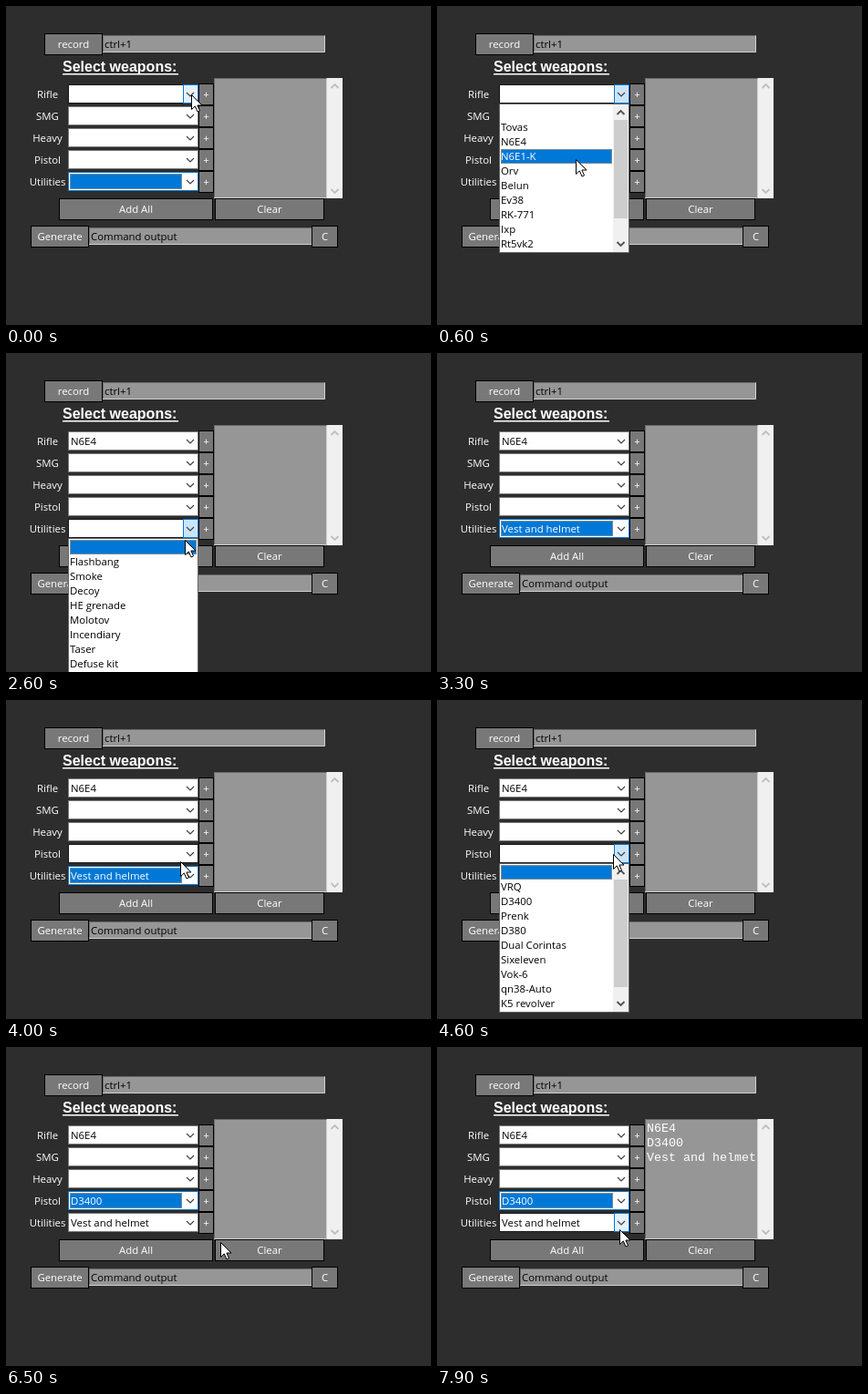
Animation of 466x350 px, one loop 8000 ms. Source, as an HTML page:

```html
<!DOCTYPE html>
<html lang="en">
<head>
<meta charset="utf-8">
<title>Weapon selector</title>
<style>
  html, body { margin: 0; width: 100%; height: 100%; overflow: hidden; background: #2d2d2d; }
  svg { display: block; width: 466px; height: 350px; }
  text { font: 11.4px "Open Sans", sans-serif; white-space: pre; }
  .title { font: bold 16px "Liberation Sans", Arial, sans-serif; }
  .mono { font: 13.33px "Liberation Mono", monospace; }
</style>
</head>
<body>
<svg id="stage" viewBox="0 0 466 350"></svg>
<script>
const LOOP = 8000, TICK = 100;
const BLUE = '#0078d7', GREY = '#969696', FACE = '#787878', DARK = '#696969', LIGHT = '#d0d0d0';
const RIFLE = 0, PISTOL = 3, UTIL = 4;
const ROW = 16, ROWS = 10;
const LABELS = ['Rifle', 'SMG', 'Heavy', 'Pistol', 'Utilities'];

// First ten entries of each list, and how many it holds in all
const LISTS = {
  [RIFLE]: { total: 12, names: ',Tovas,N6E4,N6E1-K,Orv,Belun,Ev38,RK-771,Ixp,Rt5vk2'.split(',') },
  [PISTOL]: { total: 11, names: ',VRQ,D3400,Prenk,D380,Dual Corintas,Sixeleven,Vok-6,qn38-Auto,K5 revolver'.split(',') },
  [UTIL]: { total: 10, names: ',Flashbang,Smoke,Decoy,HE grenade,Molotov,Incendiary,Taser,Defuse kit,Vest and helmet'.split(',') }
};

// Each pick opens a combo box, then stores the chosen row
const PICKS = [
  { combo: RIFLE, open: 200, close: 1300, row: 2 },
  { combo: UTIL, open: 2400, close: 3300, row: 9 },
  { combo: PISTOL, open: 4500, close: 6100, row: 2 }
];
const PRESS = 7400, ADDED = 7500;

const rowTop = i => 86 + 24 * i;
const itemTop = (i, n) => rowTop(i) + 23 + ROW * n;
const arrow = (i, x = 201) => [x, rowTop(i) + 11];
const item = (i, n) => [153, itemTop(i, n) + 11];

// Pointer glides: start, end, destination; it rests in between
const GLIDES = [
  [200, 600, item(RIFLE, 3)],
  [900, 1100, item(RIFLE, 2)],
  [1300, 1800, [177, 154]],
  [1800, 2300, arrow(UTIL)],
  [2500, 3100, item(UTIL, 9)],
  [3300, 4100, arrow(PISTOL, 194)],
  [4700, 5500, item(PISTOL, 3)],
  [5700, 5900, item(PISTOL, 2)],
  [6100, 6500, [236, 214]],
  [6500, 6900, [209, 207]],
  [7000, 7100, [198, 222]],
  [7400, 7900, [201, 200]]
];

function pointer(t) {
  let p = arrow(RIFLE, 204);
  for (const [from, to, dest] of GLIDES) {
    const k = Math.min(1, Math.max(0, (t - from) / (to - from)));
    const ease = k * k * (3 - 2 * k);
    p = p.map((v, i) => v + (dest[i] - v) * ease);
  }
  return p.map(Math.round);
}

function state(t) {
  const s = { values: LABELS.map(() => ''), focus: UTIL, open: -1 };
  for (const p of PICKS) {
    if (t < p.open) break;
    s.focus = p.combo;
    if (t < p.close) s.open = p.combo;
    else s.values[p.combo] = LISTS[p.combo].names[p.row];
  }
  return s;
}

const rect = (x, y, w, h, fill, stroke) => stroke
  ? `<rect x="${x + .5}" y="${y + .5}" width="${w - 1}" height="${h - 1}" fill="${fill}" stroke="${stroke}"/>`
  : `<rect x="${x}" y="${y}" width="${w}" height="${h}" fill="${fill}"/>`;
const text = (s, x, y, fill = '#000', anchor = 'start', cls = '') =>
  `<text class="${cls}" x="${x}" y="${y}" fill="${fill}" text-anchor="${anchor}">${s}</text>`;
const chevron = (x, y, dir, color, width = 1.2) =>
  `<path d="M${x - 4} ${y - 2 * dir}l4 ${4 * dir}l4 ${-4 * dir}" fill="none" stroke="${color}" stroke-width="${width}"/>`;
const button = (s, x, y, w, h, shift = 0) =>
  rect(x, y, w, h, FACE, '#000') + text(s, x + w / 2 + shift, y + h / 2 + 4 + shift, '#fff', 'middle');
const sunken = (x, y, w, h) => rect(x, y, w, h, GREY, DARK) +
  `<path d="M${x} ${y + h - .5}h${w - .5}v${1 - h}" fill="none" stroke="${LIGHT}"/>`;
const entry = (s, x, y, w, h) => sunken(x, y, w, h) + text(s, x + 2, y + 14);
const marked = (x, y, w, h) => rect(x, y, w, h, BLUE) +
  `<rect x="${x + .5}" y="${y + .5}" width="${w - 1}" height="${h - 1}" fill="none" stroke="#f0a050" stroke-dasharray="1 1"/>`;

function combo(i, s, mx, my) {
  const y = rowTop(i), opened = s.open === i, focused = s.focus === i && s.open < 0;
  const hot = s.open < 0 && mx >= 68 && mx < 211 && my >= y && my < y + 21;
  let out = rect(68, y, 143, 21, '#fff', focused ? BLUE : hot || opened ? '#171717' : '#7a7a7a');
  if (focused) out += marked(70, y + 2, 123, 17);
  if (opened || hot && mx >= 194) out += rect(194, y, 17, 21, opened ? '#cce4f7' : '#e5f1fb', BLUE);
  return out + chevron(202, y + 11, 1, '#404040') +
    text(s.values[i], 71, y + 15, focused ? '#fff' : '#000') +
    text(LABELS[i], 45.5, y + 15, '#fff', 'middle') +
    button('+', 211, y - 1, 17, 24);
}

function popup(i, mx, my) {
  const y = rowTop(i) + 22, { total, names } = LISTS[i];
  const scrolls = total > ROWS, inside = mx < 193 && my > y;
  const active = inside ? Math.min(ROWS - 1, Math.floor((my - itemTop(i, 0)) / ROW)) : 0;
  let out = rect(68, y - 1, 143, 164, '#fff', '#646464');
  names.forEach((name, n) => {
    const top = itemTop(i, n);
    if (n === active) out += marked(70, top, scrolls ? 122 : 139, ROW);
    out += text(name, 70, top + 12, n === active ? '#fff' : '#000');
  });
  if (scrolls) {
    out += rect(193, y, 17, 162, '#f0f0f0') + rect(194, y + 17, 15, Math.round(130 * ROWS / total), '#cdcdcd') +
      chevron(201.5, y + 9, -1, '#505050', 1.8) + chevron(201.5, y + 153, 1, '#505050', 1.8);
  }
  return out;
}

const cursor = (x, y) =>
  `<path transform="translate(${x - .5} ${y + .5})" d="M0 0V16L3.8 12.4L6.5 18.5L9 17.4L6.4 11.5H11.5Z" fill="#fff" stroke="#000"/>`;

function scene(t) {
  const s = state(t), [mx, my] = pointer(t), pressed = t >= PRESS && t < ADDED;
  let out = rect(0, 0, 466, 350, '#2d2d2d') +
    button('record', 42, 30, 64, 24) + entry('ctrl+1', 106, 32, 244, 19) +
    text('Select weapons:', 62, 72, '#fff', 'start', 'title') + rect(62, 74, 127, 1.5, '#fff');
  LABELS.forEach((_, i) => out += combo(i, s, mx, my));
  out += sunken(228, 79, 124, 132) + rect(352, 79, 17, 132, '#f0f0f0') +
    chevron(360.5, 88, -1, '#bfbfbf', 1.8) + chevron(360.5, 203, 1, '#bfbfbf', 1.8);
  if (t >= ADDED) {
    s.values.filter(Boolean).forEach((v, n) => out += text(v, 230, 93 + ROW * n, '#fff', 'start', 'mono'));
  }
  out += button('Add All', 58, 211, 169, 24, pressed ? 1 : 0) +
    button('Clear', 229, 211, 120, 24) +
    button('Generate', 27, 241, 64, 24) + entry('Command output', 91, 243, 245, 19) +
    button('C', 335, 241, 29, 24);
  if (s.open >= 0) out += popup(s.open, mx, my);
  return out + cursor(mx, my);
}

const stage = document.getElementById('stage');
const start = performance.now();
let shown = -1;

function draw(now) {
  const t = Math.floor(Math.max(0, now - start) % LOOP / TICK) * TICK;
  if (t !== shown) stage.innerHTML = scene(shown = t);
  requestAnimationFrame(draw);
}
draw(start);
</script>
</body>
</html>
```
